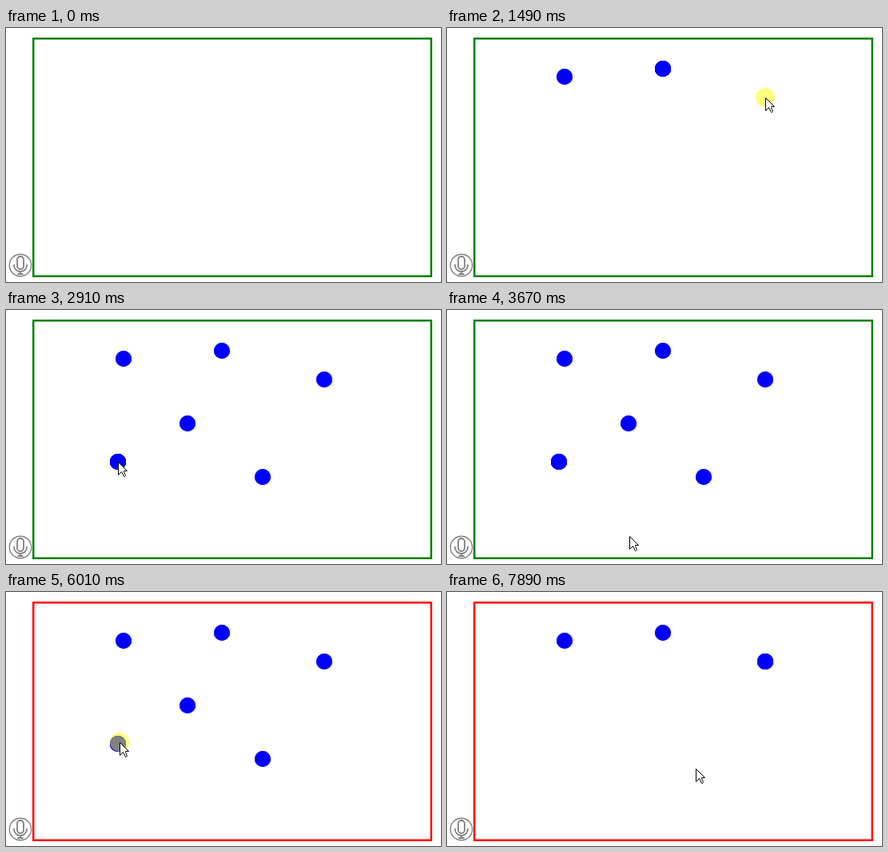
Recreate the animation shown at these times as an HTML page with a canvas. Size 544 px wide and 318 px high, loop 8000 ms.

```html
<!DOCTYPE html>
<html lang="en">
<head>
<meta charset="utf-8">
<title>Click to add and remove dots</title>
<style>
  html, body { margin: 0; width: 100%; height: 100%; overflow: hidden; background: #fff; }
  canvas { display: block; }
</style>
</head>
<body>
<canvas id="stage" width="544" height="318"></canvas>
<script>
const ctx = document.getElementById('stage').getContext('2d');
const LOOP = 8000, TICK = 78, POINTER_IN = 70, REMOVE_MODE = 5020;
const DOT_RADIUS = 10;

// The pointer rests at each stop from arrive to leave and travels in between.
const pass = (x, y, arrive, leave = arrive) => ({ x, y, arrive, leave });
const click = (x, y, arrive, leave) => ({ ...pass(x, y, arrive, leave), clicks: true });

const stops = [
  pass(455, 285, POINTER_IN),
  click(147, 61, 790, 940),
  click(270, 51, 1100, 1250),
  click(398, 87, 1410, 1660),
  click(321, 209, 1970, 2120),
  click(227, 142, 2280, 2430),
  click(140, 190, 2660, 2910),
  pass(211, 305, 3140, 3210),
  pass(228, 283, 3670, 4940),
  pass(238, 273, 5020, 5320),
  pass(112, 182, 5630),
  click(142, 188, 5930, 6090),
  click(222, 138, 6400, 6640),
  pass(330, 213, 7020),
  click(315, 213, 7180, 7430),
  pass(311, 221, 7890)
];

const smooth = p => p * p * (3 - 2 * p);

// Travel advances in discrete ticks, like a screen recording.
function pointerAt(t) {
  const next = stops.findIndex(stop => t < stop.arrive);
  if (next < 0) return stops[stops.length - 1];
  const from = stops[next - 1], to = stops[next];
  if (t < from.leave) return from;
  const span = to.arrive - from.leave;
  const ticks = Math.round(span / TICK);
  const p = smooth(Math.floor((t - from.leave) / span * ticks) / ticks);
  return {
    x: Math.round(from.x + (to.x - from.x) * p),
    y: Math.round(from.y + (to.y - from.y) * p)
  };
}

// A finished click adds a dot, or in remove mode erases the dot below it.
function dotsAt(t) {
  let dots = [];
  for (const stop of stops) {
    if (!stop.clicks || t < stop.leave) continue;
    if (stop.leave < REMOVE_MODE) dots.push(stop);
    else dots = dots.filter(dot => Math.hypot(dot.x - stop.x, dot.y - stop.y) > DOT_RADIUS);
  }
  return dots;
}

const isPressed = t => stops.some(stop =>
  stop.clicks && t >= stop.arrive + TICK && t < stop.leave);

function disc({ x, y }, r, color) {
  ctx.fillStyle = color;
  ctx.beginPath();
  ctx.arc(x, y, r, 0, 2 * Math.PI);
  ctx.fill();
}

// Repeated coats harden the edge; the newest dot is painted over most often.
function drawDots(dots) {
  dots.forEach((dot, i) => {
    const coats = i === dots.length - 1 ? 8 : 2;
    for (let n = 0; n < coats; n++) disc(dot, DOT_RADIUS, '#00f');
  });
}

function drawMicrophone() {
  ctx.save();
  ctx.translate(18, 297);
  ctx.strokeStyle = '#808080';
  ctx.lineWidth = 1.4;
  ctx.beginPath();
  ctx.arc(0, 0, 13.7, 0, 2 * Math.PI);
  ctx.stroke();
  ctx.lineWidth = 1.8;
  ctx.beginPath();
  ctx.roundRect(-4, -11, 8, 16, 4);
  ctx.moveTo(-8, -1);
  ctx.arc(0, 0, 8, Math.PI, 0, true);
  ctx.lineTo(8, -1);
  ctx.moveTo(0, 8);
  ctx.lineTo(0, 11);
  ctx.moveTo(-3.5, 11);
  ctx.lineTo(3.5, 11);
  ctx.stroke();
  ctx.restore();
}

const arrow = new Path2D('M.5 .5V16.5L4.5 12.5L7.5 18.5H8.5L9.5 17.5L7.5 12.5V11.5H11.5Z');

function drawPointer({ x, y }) {
  ctx.save();
  ctx.translate(x, y);
  ctx.fillStyle = '#fff';
  ctx.strokeStyle = '#000';
  ctx.lineWidth = 1;
  ctx.fill(arrow);
  ctx.stroke(arrow);
  ctx.restore();
}

function draw(t) {
  ctx.fillStyle = '#fff';
  ctx.fillRect(0, 0, 544, 318);
  drawMicrophone();

  ctx.strokeStyle = t < REMOVE_MODE ? '#008000' : '#f00';
  ctx.lineWidth = 2.5;
  ctx.strokeRect(34.25, 13.25, 497.5, 297.5);
  drawDots(dotsAt(t));

  if (t < POINTER_IN) return;
  const pointer = pointerAt(t);
  if (isPressed(t)) disc(pointer, 12, 'rgba(255, 255, 0, 0.5)');
  drawPointer(pointer);
}

function frame() {
  draw(performance.now() % LOOP);
  requestAnimationFrame(frame);
}
frame();
</script>
</body>
</html>
```
